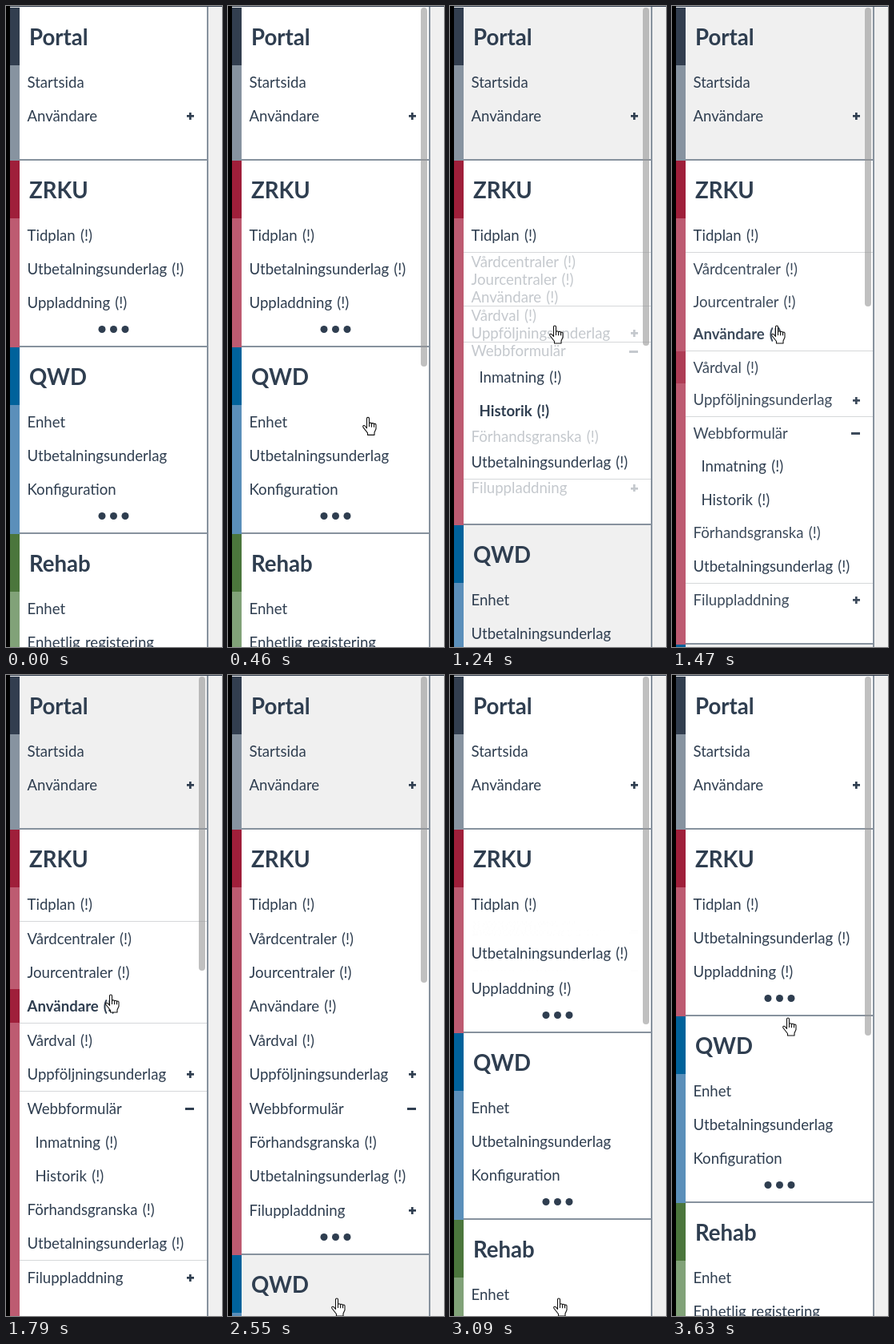
An HTML page for the animation above (3.7 s loop, 270 by 800 pixels).

```html
<!DOCTYPE html>
<html lang="sv">
<head>
<meta charset="utf-8">
<title>Portal</title>
<style>
html, body { margin: 0; width: 100%; height: 100%; overflow: hidden; }
body { position: relative; background: #f0f0f0; color: #2f3e50; font: 18.6px Lato, "Open Sans", sans-serif; word-spacing: 1.5px; }
.edge, .rule, .top, #menu, #thumb, #hand { position: absolute; }
.edge { left: 0; top: 0; width: 5px; height: 100%; background: #000; }
.rule { left: 251px; top: 0; width: 2px; height: 100%; background: #87929e; }
.top { left: 5px; right: 0; top: 0; height: 1px; background: #323e4f; }
#menu { left: 5px; top: 2px; width: 246px; }
section { background: linear-gradient(90deg, var(--light) 12px, var(--bg) 12px); }
h2 { margin: 0; padding-left: 24px; height: 72px; line-height: 74px; font-size: 27.6px; font-weight: 700;
  background: linear-gradient(90deg, var(--dark) 12px, transparent 12px); }
.row { position: relative; height: 42px; line-height: 42px; padding-left: 21.5px; overflow: hidden; white-space: nowrap; }
.sub { padding-left: 31.5px; }
.bar { position: absolute; left: 0; top: 0; width: 12px; height: 100%; background: var(--dark); opacity: 0; }
.line { margin-left: 12px; background: #d6d8da; height: 0; }
.plus, .minus { position: absolute; top: 50%; }
.plus { left: 221px; width: 9px; height: 9px; margin-top: -4px;
  background: linear-gradient(#2f3e50, #2f3e50) 50% 50% / 9px 2.7px no-repeat,
    linear-gradient(#2f3e50, #2f3e50) 50% 50% / 2.7px 9px no-repeat; }
.minus { left: 219px; width: 11px; height: 3px; margin-top: -1px; background: #2f3e50; }
.foot { position: relative; height: 35px; }
.foot::after { content: ""; position: absolute; left: 12px; right: 0; bottom: 0; height: 2px; background: #87929e; }
.dots { position: absolute; left: 124.5px; top: 8px; width: 9px; height: 9px; border-radius: 50%;
  background: #2f3e50; box-shadow: -14.5px 0 #2f3e50, 14.5px 0 #2f3e50; }
.shade { position: absolute; left: 12px; right: 0; bottom: 2px; height: 9px;
  background: linear-gradient(transparent, rgba(0, 0, 0, .2)); }
#thumb { left: 241px; top: 2px; width: 8px; border-radius: 4px; background: rgba(150, 150, 150, .6); }
#hand { left: 0; top: 0; overflow: visible; }
</style>
</head>
<body>
<div class="edge"></div>
<div id="menu"></div>
<div class="rule"></div>
<div class="top"></div>
<div id="thumb"></div>
<svg id="hand" width="18" height="24" fill="#fff" stroke="#111" stroke-width="1.1" stroke-linejoin="round">
  <path d="M5.5 14V2a1.5 1.5 0 0 1 3 0V8.5q0-1.2 1.5-1.2t1.5 1.5q.1-1 1.5-1t1.5 1.5q.2-.8 1.3-.8t1.2 1.4V15l-2 4.5V22.5H6.5V20L1 13q-.8-1.8.6-2.2t2.4 1.4Z"/>
  <path fill="none" d="M8.5 8.5v4M11.5 8.8v4M14.5 9.3v3.5"/>
</svg>
<script>
const LOOP = 3700, STEPS = 48;
const ROW = 42, LIST_TOP = 265;
const OPEN = 14, LEAVE = 28, CLOSE = 35.5, GROW = 6.5; // in steps

// Row fields: text, kind (extra rows grow, sub rows switch), mark, line below
const row = (text, kind = 'fixed', mark = '', line = false) => ({ text, kind, mark, line });
const sections = [
  { name: 'Portal', dark: '#323e4f', light: '#8793a0', dots: false,
    rows: [row('Startsida'), row('Användare', 'fixed', 'plus')] },
  { name: 'ZRKU', dark: '#9f1f3a', light: '#bd5b71', dots: true,
    rows: [
      row('Tidplan (!)', 'fixed', '', true),
      row('Vårdcentraler (!)', 'extra'),
      row('Jourcentraler (!)', 'extra'),
      row('Användare (!)', 'extra', '', true),
      row('Vårdval (!)', 'extra'),
      row('Uppföljningsunderlag', 'extra', 'plus', true),
      row('Webbformulär', 'extra', 'minus'),
      row('Inmatning (!)', 'sub'),
      row('Historik (!)', 'sub'),
      row('Förhandsgranska (!)', 'extra'),
      row('Utbetalningsunderlag (!)', 'fixed', '', true),
      row('Filuppladdning', 'extra', 'plus'),
      row('Uppladdning (!)', 'closed')
    ] },
  { name: 'QWD', dark: '#00629b', light: '#5b8fba', dots: true,
    rows: ['Enhet', 'Utbetalningsunderlag', 'Konfiguration'].map(t => row(t)) },
  { name: 'Rehab', dark: '#4b763c', light: '#81a278', dots: true,
    rows: ['Enhet', 'Enhetlig registering'].map(t => row(t)) }
];

const byId = id => document.getElementById(id);
function add(parent, tag, cls = '', text = '') {
  const el = document.createElement(tag);
  el.className = cls;
  el.textContent = text;
  return parent.appendChild(el);
}

for (const s of sections) {
  s.el = add(byId('menu'), 'section');
  s.el.style.setProperty('--dark', s.dark);
  s.el.style.setProperty('--light', s.light);
  add(s.el, 'h2', '', s.name);
  for (const r of s.rows) {
    r.el = add(s.el, 'div', r.kind === 'sub' ? 'row sub' : 'row');
    r.label = add(r.el, 'span', '', r.text);
    r.bar = add(r.el, 'i', 'bar');
    if (r.mark) r.markEl = add(r.el, 'i', r.mark);
    if (r.line) r.lineEl = add(s.el, 'div', 'line');
  }
  const foot = add(s.el, 'div', 'foot');
  if (s.dots) {
    s.shade = add(foot, 'i', 'shade');
    s.shade.style.opacity = 0;
    s.dotsEl = add(foot, 'i', 'dots');
  }
}
const active = sections[1];

const clamp = x => Math.min(1, Math.max(0, x));
const ramp = (k, a, b) => clamp((k - a) / (b - a));

// cubic-bezier(.25, .1, .25, 1)
function ease(x) {
  const bez = (p, q, u) => 3 * p * u * (1 - u) ** 2 + 3 * q * u * u * (1 - u) + u ** 3;
  let lo = 0, hi = 1;
  for (let i = 0; i < 24; i++) {
    const mid = (lo + hi) / 2;
    if (bez(.25, .25, mid) < x) lo = mid; else hi = mid;
  }
  return bez(.1, 1, lo);
}

const isOpen = k => k >= OPEN && k < LEAVE;
const growth = k => ease(ramp(k, OPEN, OPEN + GROW)) - ease(ramp(k, CLOSE, CLOSE + GROW));

function rowHeight(r, k) {
  if (r.kind === 'extra') return ROW * growth(k);
  if (r.kind === 'sub') return isOpen(k) ? ROW : 0;
  if (r.kind === 'closed') return k < OPEN || k > CLOSE ? ROW : 0;
  return ROW;
}
const lineHeight = (r, k) => r.line ? growth(k) : 0;
const listHeight = k => active.rows.reduce((sum, r) => sum + rowHeight(r, k) + lineHeight(r, k), 0);

// Pointer tip: step, x, y
const path = [
  [1, 268, 796], [4, 225, 640], [7, 150, 450], [9, 131, 399], [23, 131, 399],
  [25, 132, 560], [27, 135, 804], [28, 136, 778], [40, 136, 778],
  [43, 139, 725], [46, 148, 549], [47, 145, 428]
];
function pointer(k) {
  const i = Math.max(1, path.findIndex(p => p[0] >= k));
  const [k0, x0, y0] = path[i - 1], [k1, x1, y1] = path[i];
  const f = ramp(k, k0, k1);
  return [x0 + (x1 - x0) * f, y0 + (y1 - y0) * f];
}

// Hover lags a little behind the layout
function hovered(k) {
  if (!isOpen(k)) return null;
  const y = pointer(k)[1] + 1, seen = k - 1.5;
  let top = LIST_TOP;
  for (const r of active.rows) {
    const end = top + rowHeight(r, seen);
    if (y >= top && y < end) return r;
    top = end + lineHeight(r, seen);
  }
  return null;
}

function heat(r, k) {
  let h = 0;
  for (let j = OPEN; j < k; j++) h = clamp(h + (hovered(j) === r ? .5 : -.5));
  return h;
}

function draw(k) {
  const e = growth(k), open = isOpen(k), hot = hovered(k);
  const grey = Math.round(255 - 15 * (ramp(k, 7, 11) - ramp(k, 33, 37)));
  for (const s of sections)
    s.el.style.setProperty('--bg', s === active ? '#fff' : `rgb(${grey},${grey},${grey})`);

  for (const r of active.rows) {
    r.el.style.height = r.el.style.lineHeight = rowHeight(r, k) + 'px';
    r.label.style.fontWeight = r === hot ? 700 : 400;
    r.bar.style.opacity = heat(r, k);
    if (r.kind === 'extra') {
      r.label.style.opacity = e * e;
      if (r.markEl) r.markEl.style.opacity = e * e;
    }
    if (r.lineEl) {
      r.lineEl.style.height = lineHeight(r, k) + 'px';
      r.lineEl.style.opacity = open ? 1 : 0;
    }
  }
  active.dotsEl.style.opacity = open ? 0 : 1;
  active.shade.style.opacity = k < OPEN ? ramp(k, 8, 11) : 0;

  const thumb = byId('thumb').style;
  thumb.opacity = ramp(k, 1, 3);
  thumb.height = 773000 / (1725 + listHeight(k - 1) - 3 * ROW) + 'px';

  const [x, y] = pointer(k), hand = byId('hand').style;
  hand.visibility = k > 0 ? 'visible' : 'hidden';
  hand.transform = `translate(${x - 7}px, ${y - .5}px)`;
}

const start = performance.now();
function tick() {
  const t = (performance.now() - start) % LOOP;
  draw(Math.min(STEPS - 1, Math.floor(t / LOOP * STEPS + .1)));
  requestAnimationFrame(tick);
}
tick();
</script>
</body>
</html>
```
